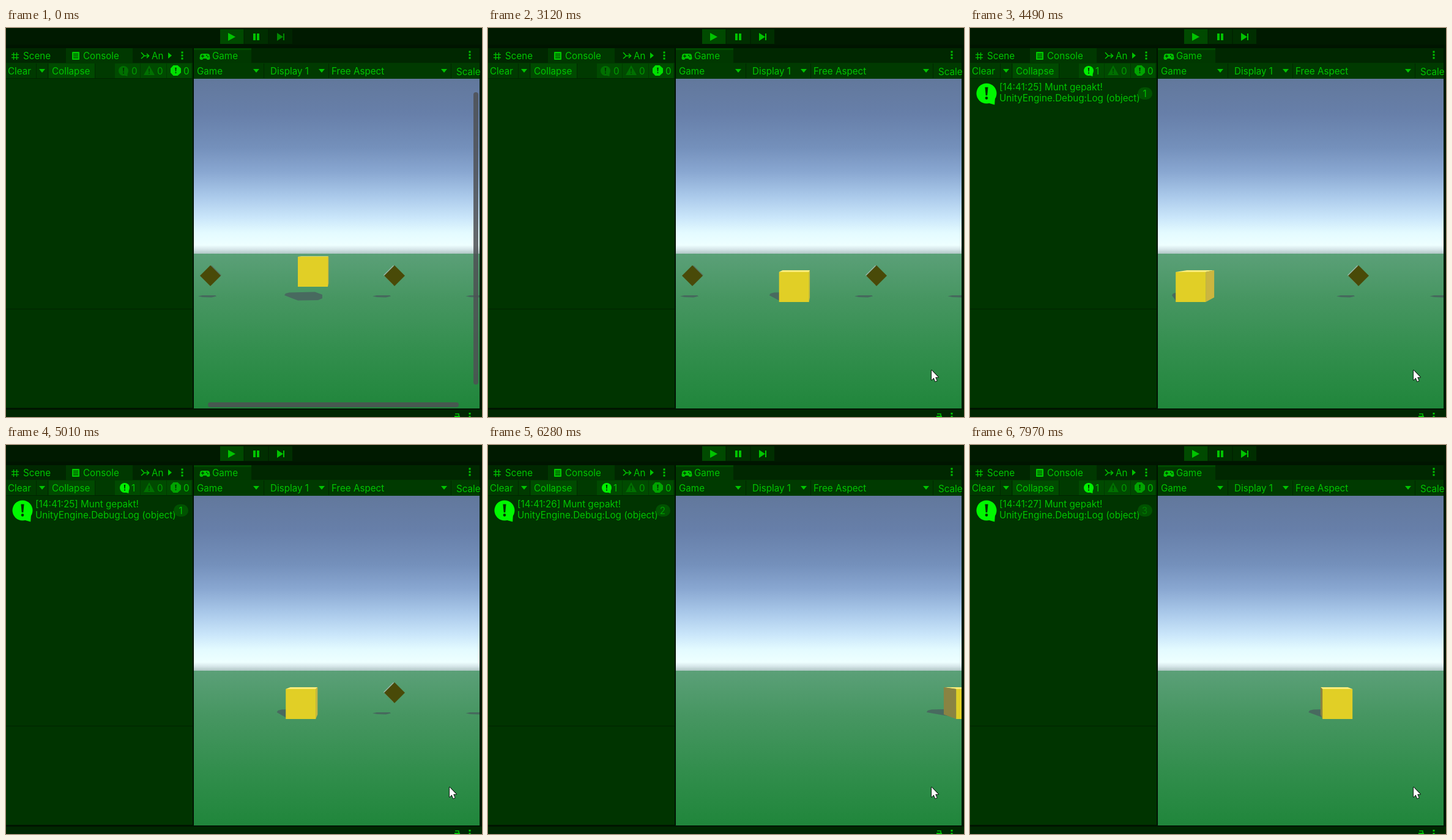
Recreate the animation shown at these times as an HTML page with a canvas. Size 778 px wide and 636 px high, loop 8000 ms.

```html
<!DOCTYPE html>
<html lang="en">
<head>
<meta charset="utf-8">
<title>Coin pickup in the game view</title>
<style>
  html, body { margin: 0; width: 100%; height: 100%; overflow: hidden; background: #001a00; }
  canvas { display: block; }
</style>
</head>
<body>
<canvas id="stage" width="778" height="636"></canvas>
<script>
const ctx = document.getElementById('stage').getContext('2d');
const LOOP = 8000;
const GREEN = '#00c400', DIM = '#007000', DARK = '#003400';
const HORIZON = 365, CENTER = 540, BACK = 0.91, SIZE = 49, FLOOR = 399;

// Left edge of the cube's front face: [time, x]
const path = [[3070, 477], [3350, 447], [3920, 328], [4140, 315], [4290, 315], [4490, 336], [5060, 469],
  [5560, 591], [5860, 667], [6280, 765], [6690, 812], [7100, 762], [7550, 652], [8000, 571]];
const coins = [
  { x: 334, gone: 3850, log: 3900, second: 25, badge: '#00c000' },
  { x: 635, gone: 5490, log: 5610, second: 26, badge: '#009c00' },
  { x: 796, gone: 6230, log: 6330, second: 27, badge: '#007a00' }
];

const clamp = v => Math.max(0, Math.min(1, v));
const mix = (a, b, k) => a + (b - a) * k;

function rect(x, y, w, h, color) {
  ctx.fillStyle = color;
  ctx.fillRect(x, y, w, h);
}
function poly(color, ...points) {
  ctx.fillStyle = color;
  ctx.beginPath();
  points.forEach(p => ctx.lineTo(p[0], p[1]));
  ctx.closePath();
  ctx.fill();
}
function round(x, y, w, h, r, color) {
  ctx.fillStyle = color;
  ctx.beginPath();
  ctx.roundRect(x, y, w, h, r);
  ctx.fill();
}
function disc(x, y, r, color) {
  round(x - r, y - r, 2 * r, 2 * r, r, color);
}
function text(str, x, y, color = GREEN) {
  ctx.font = '15.2px Inter, sans-serif';
  ctx.fillStyle = color;
  ctx.fillText(str, x, y);
}
function line(color, width, ...points) {
  ctx.strokeStyle = color;
  ctx.lineWidth = width;
  ctx.beginPath();
  points.forEach(p => ctx.lineTo(p[0], p[1]));
  ctx.stroke();
}
function dots(x, y) {
  for (const d of [-5, 0, 5]) rect(x - 1.5, y + d - 1.5, 3, 3, GREEN);
}
function dropArrow(x) {
  poly(GREEN, [x - 5, 67], [x + 5, 67], [x, 73]);
}
function exclaim(x, y, s, color) {
  poly(color, [x - 2 * s, y - 8 * s], [x + 2 * s, y - 8 * s], [x + s, y + 2.5 * s], [x - s, y + 2.5 * s]);
  disc(x, y + 6 * s, 1.8 * s, color);
}
function bubble(x, y, r, color) {
  disc(x, y, r, color);
  poly(color, [x + r * 0.2, y + r * 0.95], [x + r * 0.85, y + r * 0.4], [x + r * 0.8, y + r * 1.12]);
  exclaim(x, y, r / 13, DARK);
}

function cubeX(t) {
  if (t <= path[0][0]) return path[0][1];
  const i = path.findIndex(p => p[0] > t) - 1;
  const slope = n => {
    const a = path[n - 1], b = path[n], c = path[n + 1];
    if (!a) return 0;
    if (!c) return (b[1] - a[1]) / (b[0] - a[0]);
    return (b[1] - a[1]) * (c[1] - b[1]) <= 0 ? 0 : (c[1] - a[1]) / (c[0] - a[0]);
  };
  const [t0, x0] = path[i], [t1, x1] = path[i + 1];
  const span = t1 - t0, k = (t - t0) / span, q = 1 - k;
  return x0 * q * q * (1 + 2 * k) + x1 * k * k * (3 - 2 * k)
    + span * k * q * (slope(i) * q - slope(i + 1) * k);
}
function cubeTop(t) {
  if (t < 300) return 374;
  if (t < 1780) return mix(375, 404, clamp((t - 1250) / 530) ** 2);
  return mix(404, FLOOR, clamp((t - 1780) / 150));
}

function drawTopBar(t) {
  rect(0, 0, 778, 636, '#001a00');
  rect(0, 27, 778, 6, '#001500');
  rect(350, 2, 38.5, 24, '#004a00');
  rect(389.5, 2, 39, 24, '#002e00');
  rect(429.5, 2, 38.5, 24, t < 300 ? '#002400' : '#002e00');
  poly(GREEN, [363, 8], [375, 14.5], [363, 21]);
  rect(404, 9, 4, 11, GREEN);
  rect(410, 9, 4, 11, GREEN);
  const step = t < 300 ? '#008a00' : GREEN;
  poly(step, [443, 8], [453, 14.5], [443, 21]);
  rect(453, 9, 2, 11, step);
}

function drawConsole(t) {
  const logged = coins.filter(c => t >= c.log);
  const last = logged[logged.length - 1];

  rect(0, 33, 305, 24, '#002700');
  rect(98, 33, 109, 24, '#003800');
  rect(0, 57, 305, 26, '#003a00');
  rect(0, 82, 305, 1, '#002300');
  rect(0, 83, 305, 538, '#003400');
  rect(0, 459, 305, 1, '#002300');

  for (const d of [0, 5]) {
    line(GREEN, 1.3, [12.5 + d, 40], [12.5 + d, 52]);
    line(GREEN, 1.3, [9, 43.5 + d], [21, 43.5 + d]);
  }
  text('Scene', 28, 51);
  round(108, 39, 12, 13, 1, GREEN);
  for (const y of [42, 45, 48]) rect(110, y, 8, 1.3, '#003800');
  text('Console', 126, 51);
  line(GREEN, 1.6, [221, 40], [226, 45.5], [233, 45.5]);
  line(GREEN, 1.6, [221, 50], [226, 45.5]);
  line(GREEN, 1.6, [230, 42], [233.5, 45.5], [230, 49]);
  text('An', 238, 51);
  poly(GREEN, [265, 40], [271, 45], [265, 50]);
  dots(288, 45);

  text('Clear', 3, 76);
  rect(49, 58, 1, 24, '#002900');
  dropArrow(59);
  rect(68, 58, 1, 24, '#002900');
  rect(70, 58, 75, 24, '#004a00');
  rect(145, 58, 1, 24, '#002900');
  text('Collapse', 75, 76);
  for (const [x, w] of [[178, 41], [220, 42], [263, 40]]) rect(x, 58, w, 24, '#004a00');

  if (last) {
    bubble(194, 70, 8, '#00f000');
    text('1', 205, 76);
  } else {
    bubble(192, 70, 8, DIM);
    text('0', 205, 76, '#009c00');
  }
  poly(DIM, [234, 61], [243, 77], [225, 77]);
  exclaim(234, 71, 0.55, '#004000');
  text('0', 247, 76, '#009c00');
  const alert = last ? '#00a400' : '#00e000';
  poly(alert, [273.5, 61], [280.5, 61], [286, 66], [286, 73], [280.5, 78], [273.5, 78], [269, 73], [269, 66]);
  exclaim(277.5, 69.5, 0.6, DARK);
  text('0', 290, 76);

  if (last) {
    bubble(27, 107, 16.5, '#00f800');
    text(`[14:41:${last.second}] Munt gepakt!`, 48, 102);
    text('UnityEngine.Debug:Log (object)', 48, 120);
    round(274, 97, 24, 20, 10, '#005200');
    ctx.textAlign = 'center';
    text(logged.length, 285.5, 113, last.badge);
    ctx.textAlign = 'left';
  }
}

function drawGameHeader() {
  rect(305, 33, 2, 589, '#001200');
  rect(307, 33, 467, 24, '#002700');
  rect(307, 33, 94, 24, '#003800');
  rect(307, 33, 94, 3, '#004a00');
  rect(307, 57, 467, 26, '#003a00');
  rect(774, 33, 4, 589, '#001800');

  round(317, 42, 16, 8, 4, GREEN);
  disc(319.5, 49, 3, GREEN);
  disc(330.5, 49, 3, GREEN);
  rect(319, 45.3, 5, 1.4, DARK);
  rect(320.8, 43.5, 1.4, 5, DARK);
  disc(328, 44.8, 1, DARK);
  disc(330, 47, 1, DARK);
  text('Game', 337, 51);
  dots(758, 44);

  text('Game', 312, 76);
  text('Display 1', 432, 76);
  text('Free Aspect', 532, 76);
  text('Scale', 736, 77);
  [409, 516, 716].forEach(dropArrow);
  for (const x of [421, 527, 727]) rect(x, 58, 1, 24, '#002600');

  rect(0, 621, 778, 3, '#001500');
  rect(0, 624, 778, 12, '#002700');
  line(GREEN, 1.5, [734, 631], [740, 631], [740, 634], [741, 636]);
  rect(733, 634, 9, 2, GREEN);
  rect(756.5, 629, 3, 3, GREEN);
  rect(756.5, 634, 3, 2, GREEN);
}

function gradient(y0, y1, stops) {
  const g = ctx.createLinearGradient(0, y0, 0, y1);
  stops.forEach(([y, color]) => g.addColorStop((y - y0) / (y1 - y0), color));
  return g;
}
const sky = gradient(83, 369, [[83, '#62789c'], [140, '#677fa9'], [195, '#7490bb'], [235, '#89a7d1'],
  [275, '#aac9ea'], [310, '#cae6fa'], [335, '#e4fbff'], [355, '#eeffff'], [362, '#d6e6e9'], [369, '#b0c6c4']]);
const ground = gradient(369, 622, [[369, '#5ba078'], [440, '#47966266'.slice(0, 7)], [530, '#328e4d'], [622, '#20863b']]);

function drawCoin({ x }) {
  const diamond = (dx, dy, r, color) => poly(color, [x + dx - r, 405 + dy], [x + dx, 405 + dy - r],
    [x + dx + r, 405 + dy], [x + dx, 405 + dy + r]);
  const lean = x < CENTER ? 2 : -2;
  diamond(lean, -1, 16, x < CENTER ? '#597464' : '#9bb9ac');
  diamond(0, 0, 17, '#494a08');
}
function drawCoinShadow({ x }) {
  const c = 329 + (x - 334) * 0.947;
  poly('#46695d', [c - 15, 438.5], [c - 8, 437], [c + 13, 437], [c + 15, 438.5], [c + 7, 440.5], [c - 8, 440]);
}

function drawCube(t) {
  const x = cubeX(t), y = cubeTop(t), r = x + SIZE, b = y + SIZE;
  const bx = v => CENTER + (v - CENTER) * BACK;
  const by = v => HORIZON + (v - HORIZON) * BACK;
  const lift = clamp((FLOOR - y) / 25);
  const tip = 567 + (x - 591) * (x < 591 ? 0.93 : 0.86) - 6 * lift;

  poly('#486a5f', [tip, 437], [tip + 2, 434], [tip + 8, 432.5], [tip + 50, 431.5],
    [x + 40, 436], [x + 40, 442], [x + 33, 445], [x, 445.5]);
  poly('#fbec78', [x, y], [r, y], [bx(r), by(y)], [bx(x), by(y)]);
  if (r < CENTER) poly('#ccb63f', [r, y], [bx(r), by(y)], [bx(r), by(b)], [r, b]);
  if (x > CENTER) poly('#8a8342', [x, y], [bx(x), by(y)], [bx(x), by(b)], [x, b]);
  rect(x, y, SIZE, SIZE, '#e1cf26');
}

function drawGame(t) {
  ctx.save();
  ctx.beginPath();
  ctx.rect(307, 83, 467, 539);
  ctx.clip();
  rect(307, 83, 467, 286, sky);
  rect(307, 369, 467, 253, ground);
  const left = coins.filter(c => t < c.gone);
  left.forEach(drawCoinShadow);
  left.forEach(drawCoin);
  drawCube(t);
  if (t < 100) {
    round(764, 105, 8, 478, 4, 'rgba(78,80,84,.85)');
    round(330, 612, 410, 8, 4, 'rgba(78,80,84,.85)');
  }
  ctx.restore();
}

function drawPointer(t) {
  if (t < 1010) return;
  const k = 1 - (1 - clamp((t - 1010) / 490)) ** 2;
  ctx.save();
  ctx.translate(mix(703, 725, k), mix(627, 559.5, k));
  ctx.beginPath();
  const shape = k < 0.08
    ? [[0, -9], [4, -4], [1, -4], [1, 7], [4, 7], [0, 12], [-4, 7], [-1, 7], [-1, -4], [-4, -4]]
    : [[0, 0], [0, 16], [3.6, 12.6], [6, 18.3], [8.6, 17.2], [6.2, 11.6], [11, 11.4]];
  shape.forEach(p => ctx.lineTo(...p));
  ctx.closePath();
  ctx.lineWidth = 1.6;
  ctx.lineJoin = 'round';
  ctx.strokeStyle = '#000';
  ctx.stroke();
  ctx.fillStyle = '#fff';
  ctx.fill();
  ctx.restore();
}

function frame() {
  const t = performance.now() % LOOP;
  drawTopBar(t);
  drawConsole(t);
  drawGameHeader();
  drawGame(t);
  drawPointer(t);
  requestAnimationFrame(frame);
}
frame();
</script>
</body>
</html>
```
